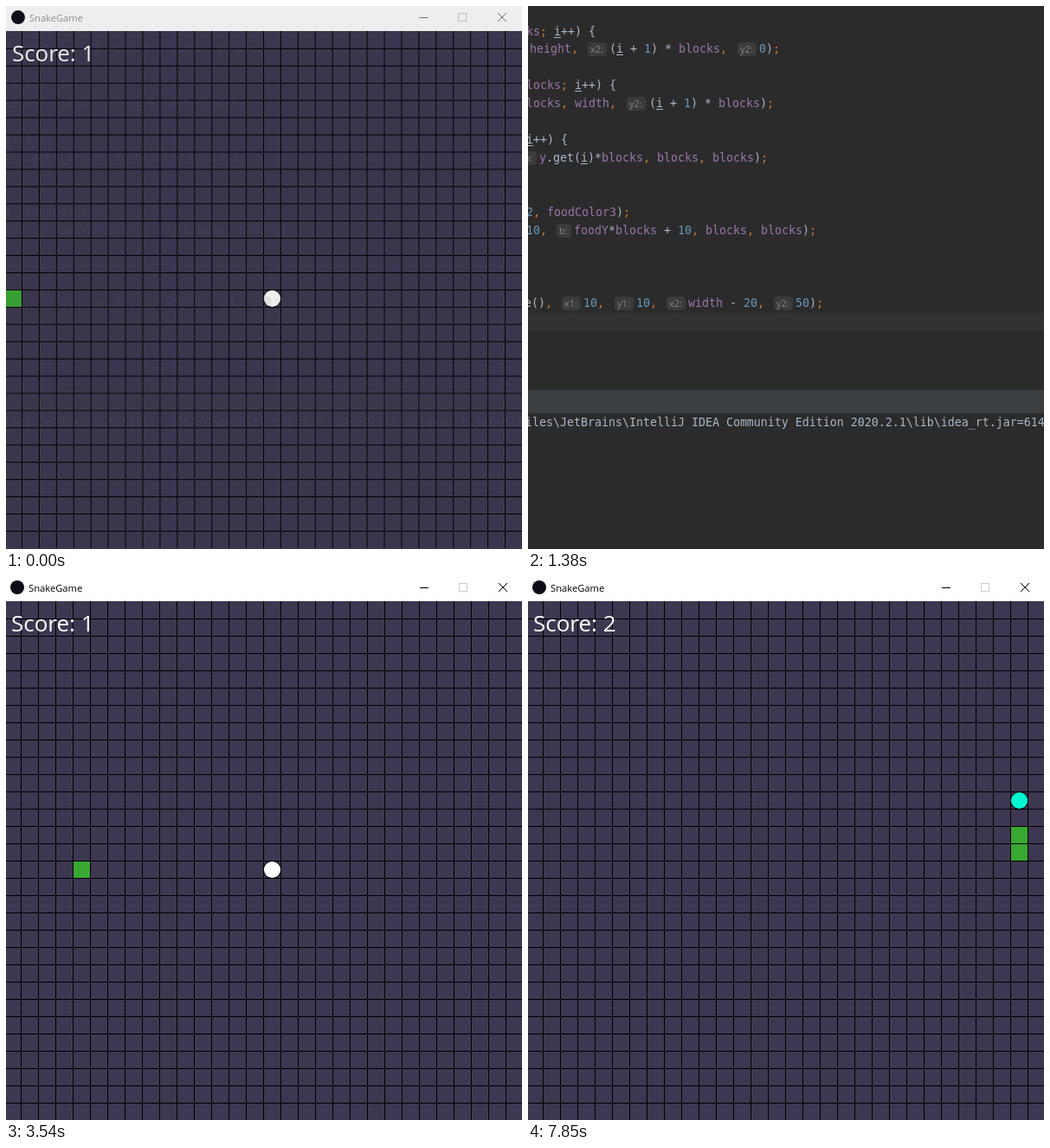
An HTML page with a canvas that plays this animation: 596 by 628 pixels, repeating every 8000 ms.

```html
<!DOCTYPE html>
<html lang="en">
<head>
<meta charset="utf-8">
<title>SnakeGame</title>
<style>
html, body { margin: 0; width: 596px; height: 628px; overflow: hidden; background: #2b2b2b; }
canvas { display: block; }
</style>
</head>
<body>
<canvas id="stage" width="596" height="628"></canvas>
<script>
const ctx = document.getElementById('stage').getContext('2d');
const LOOP = 8000, CELL = 20, LEFT = -3, TOP = 28;
const MONO = '13.29px "DejaVu Sans Mono", monospace';

// Times at which the snake advances in the second game
const STEPS = [3080, 3230, 3380, 3540, 3690, 3860, 4010, 4180, 4330, 4500,
  4670, 4840, 5030, 5180, 5350, 5500, 5670, 5840, 6010, 6180,
  6350, 6520, 6690, 6840, 7070, 7220, 7370, 7530, 7680, 7850];
const EATEN = 5350;

// Code runs: x, middle y, text; a run ending in ":" is a parameter hint
const CODE = [
  [-2, 30, 'ks; i++) {'],
  [2, 50, 'height,'], [72, 50, 'x2:'], [94, 50, '(i + 1) * blocks,'], [245, 50, 'y2:'], [267, 50, '0);'],
  [-2, 92, 'locks; i++) {'],
  [-2, 113, 'locks, width,'], [117, 113, 'y2:'], [140, 113, '(i + 1) * blocks);'],
  [-2, 155, 'i++) {'],
  [-4, 176, 'b:'], [13, 176, 'y.get(i)*blocks, blocks, blocks);'],
  [-2, 239, '2, foodColor3);'],
  [-2, 260, '10,'], [36, 260, 'b:'], [53, 260, 'foodY*blocks + 10, blocks, blocks);'],
  [-4, 344, 'e(),'], [42, 344, 'x1:'], [64, 344, '10,'], [103, 344, 'y1:'], [125, 344, '10,'],
  [163, 344, 'x2:'], [185, 344, 'width - 20,'], [287, 344, 'y2:'], [309, 344, '50);']
];
const CONSOLE = 'iles\\JetBrains\\IntelliJ IDEA Community Edition 2020.2.1\\lib\\idea_rt.jar=61417';

function rect(x, y, w, h, color) {
  ctx.fillStyle = color;
  ctx.fillRect(x, y, w, h);
}

function text(str, x, y, font, color) {
  ctx.font = font;
  ctx.fillStyle = color;
  ctx.fillText(str, x, y);
}

function disc(x, y, r, color) {
  ctx.fillStyle = color;
  ctx.beginPath();
  ctx.arc(x, y, r, 0, 7);
  ctx.fill();
}

function tokenColor(token) {
  if (/^\d/.test(token)) return '#6897bb';
  if (/^[,;]/.test(token)) return '#cc7832';
  if (/^(ks|b?locks|width|height|foodY|foodColor3|y)$/.test(token)) return '#9876aa';
  return '#a9b7c6';
}

function drawHint(x, y, label) {
  ctx.fillStyle = '#3b3b3b';
  ctx.beginPath();
  ctx.roundRect(x - 3, y - 8, label.length * 5 + 7, 16, 4);
  ctx.fill();
  text(label, x, y + 4, '11px "Open Sans", sans-serif', '#858585');
}

function drawCode(x, y, code) {
  for (const m of code.matchAll(/\w+|[^\w\s]/g)) {
    const tx = x + m.index * 8;
    text(m[0], tx, y + 4, MONO, tokenColor(m[0]));
    if (m[0] === 'i') rect(tx, y + 6, 8, 1, '#a9b7c6');
  }
}

function drawEditor() {
  rect(0, 0, 596, 628, '#2b2b2b');
  rect(0, 355, 596, 21, '#323232');
  rect(0, 444, 596, 27, '#3c3f41');
  for (const [x, y, str] of CODE) (str.endsWith(':') ? drawHint : drawCode)(x, y, str);
  text(CONSOLE, -3, 486, MONO, '#a9b7c6');
}

function drawTitleBar(active) {
  rect(-3, -3, 601, 31, '#fff');
  disc(13, 12, 8, '#0c0d17');
  text('SnakeGame', 26, 17, '11.2px "Open Sans", sans-serif', active ? '#000' : '#999');
  rect(478, 12, 10, 1, active ? '#000' : '#777');
  ctx.lineWidth = 1;
  ctx.strokeStyle = '#ccc';
  ctx.strokeRect(523.5, 7.5, 9, 9);
  ctx.strokeStyle = active ? '#000' : '#777';
  ctx.beginPath();
  ctx.moveTo(569, 7); ctx.lineTo(579, 17);
  ctx.moveTo(579, 7); ctx.lineTo(569, 17);
  ctx.stroke();
}

// The snake runs right along row 15, then turns up in column 28
const cellAt = n => [Math.min(n, 28), 15 - Math.max(0, n - 28)];

function drawGame(head, eaten, active) {
  rect(-3, 28, 601, 601, '#3d3751');
  drawTitleBar(active);
  for (let i = 1; i < 30; i++) {
    rect(LEFT + i * CELL, TOP, 1, 600, '#000');
    rect(-3, TOP + i * CELL, 601, 1, '#000');
  }
  for (let n = eaten ? head - 1 : head; n <= head; n++) {
    const [c, r] = cellAt(n);
    rect(LEFT + c * CELL + 1, TOP + r * CELL + 1, 19, 19, '#38a832');
  }
  const [fc, fr] = eaten ? [28, 11] : [15, 15];
  const fx = LEFT + fc * CELL + 10.5, fy = TOP + fr * CELL + 10.5;
  disc(fx, fy, 10.5, '#000');
  disc(fx, fy, 9.6, eaten ? '#00f5d0' : '#fff');
  text('Score: ' + (eaten ? 2 : 1), 6, 63, '26px "Open Sans", sans-serif', '#fff');
}

// Opacity and scale of the window while it pops up
function popup(t) {
  if (t < 70) return [0.92, 0.9965];
  if (t < 1380) return [1, 1];
  if (t < 2780) return [0, 1];
  if (t < 2850) return [0.12, 0.94];
  if (t < 2930) return [0.42, 0.9705];
  if (t < 3000) return [0.92, 0.9965];
  return [1, 1];
}

function drawCursor(x, y) {
  const shape = [[0, 0], [0, 17], [4, 13.3], [7, 20], [9.6, 19], [6.8, 12.2], [12, 12]];
  ctx.beginPath();
  for (const [dx, dy] of shape) ctx.lineTo(x + dx, y + dy);
  ctx.closePath();
  ctx.fillStyle = '#fff';
  ctx.strokeStyle = '#000';
  ctx.lineWidth = 1;
  ctx.fill();
  ctx.stroke();
}

function draw(t) {
  const [alpha, scale] = popup(t);
  const head = t < 1380 ? Math.min(8, Math.floor((t + 85) / 154)) : STEPS.filter(s => s <= t).length;
  ctx.globalAlpha = 1;
  drawEditor();
  if (alpha) {
    // Paint the window opaque, then let the editor shine through as a whole
    ctx.save();
    ctx.translate(293, 303);
    ctx.scale(scale, scale);
    ctx.translate(-293, -303);
    drawGame(head, t >= EATEN, t >= 3300);
    ctx.restore();
    if (alpha < 1) {
      ctx.globalAlpha = 1 - alpha;
      drawEditor();
      ctx.globalAlpha = 1;
    }
  }
  if (t >= 2160 && t < 3460) {
    const left = Math.max(0, 1 - (t - 2160) / 600) ** 3;
    drawCursor(361.5 + 90 * left, (t < 3000 ? 368.5 : 365.5) - 60 * left);
  }
}

function frame() {
  draw(performance.now() % LOOP);
  requestAnimationFrame(frame);
}
frame();
</script>
</body>
</html>
```
